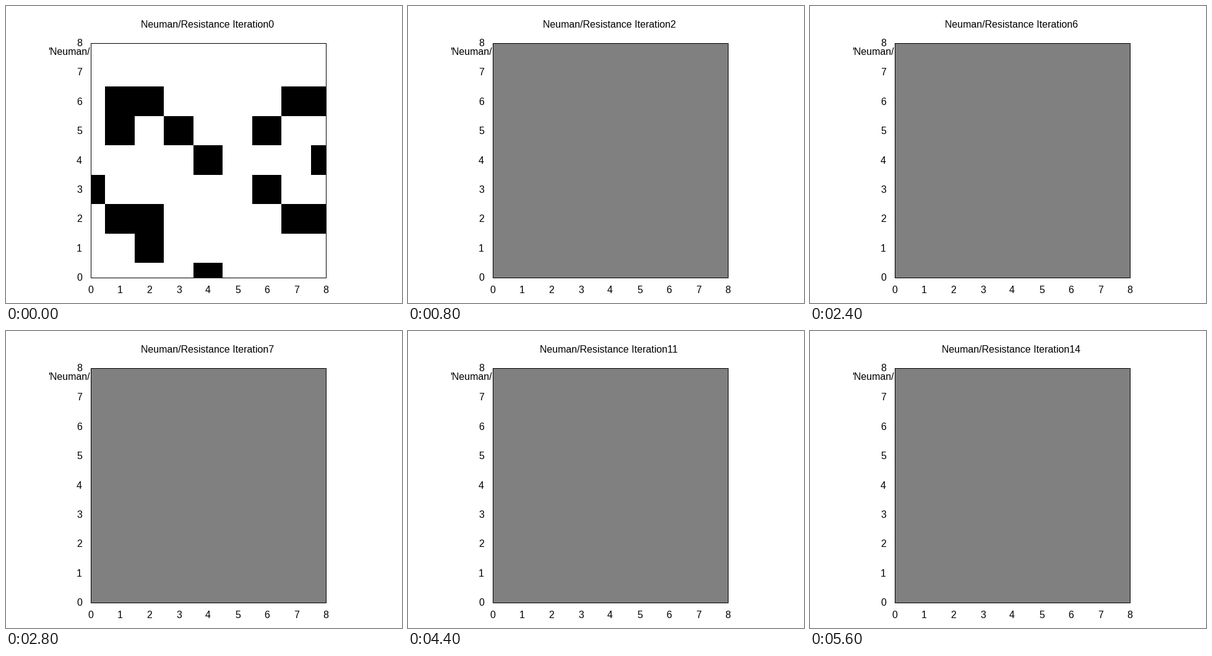
A matplotlib script that plays this animation: 640x480 px, repeating every 6000 ms.

```python
import math

import matplotlib.pyplot as plt
from matplotlib.animation import FuncAnimation
from matplotlib.patches import Rectangle

WIDTH, HEIGHT, DPI = 640, 480, 72
FRAMES, INTERVAL = 15, 400
LEFT, RIGHT, TOP, BOTTOM = 137, 517, 60, 439
STEP = 47.5

# Black cells of each generation: row -> columns
GENERATIONS = [
    {6: (1, 2, 7, 8), 5: (1, 3, 6), 4: (4, 8), 3: (0, 6),
     2: (1, 2, 7, 8), 1: (2,), 0: (4,)},
    {6: (1, 8), 5: (2,), 3: (8,), 2: (0, 2)},
]

plt.rcParams["font.family"] = "Liberation Sans"
plt.rcParams["text.hinting"] = "force_autohint"

fig = plt.figure(figsize=(WIDTH / DPI, HEIGHT / DPI), dpi=DPI, facecolor="white")
ax = fig.add_axes([0, 0, 1, 1])
ax.set_xlim(0, WIDTH)
ax.set_ylim(HEIGHT, 0)
ax.axis("off")


def box(x0, y0, x1, y1, color="black", z=1):
    """Fill the pixels from (x0, y0) up to, not including, (x1, y1)."""
    return ax.add_patch(Rectangle((x0, y0), x1 - x0, y1 - y0, facecolor=color,
                                  linewidth=0, antialiased=False, zorder=z))


def label(x, baseline, text):
    return ax.text(x, baseline, text, fontsize=16, color="black",
                   ha="left", va="baseline", zorder=4)


def nearest(value):
    return math.floor(value + 0.5)


def cell(col, row):
    x0 = max(LEFT, math.floor(LEFT + STEP * (col - 0.5)))
    x1 = min(RIGHT, math.floor(LEFT + STEP * (col + 0.5)))
    y0 = max(TOP, nearest(BOTTOM - STEP * (row + 0.5)))
    y1 = min(BOTTOM, nearest(BOTTOM - STEP * (row - 0.5)))
    return box(x0, y0, x1, y1)


layers = [[cell(col, row) for row, cols in rows.items() for col in cols]
          for rows in GENERATIONS]
layers.append([box(LEFT, TOP, RIGHT, BOTTOM, "#808080")])

# One-pixel frame around the plot
box(LEFT, TOP, RIGHT + 1, TOP + 1, z=3)
box(LEFT, BOTTOM, RIGHT + 1, BOTTOM + 1, z=3)
box(LEFT, TOP, LEFT + 1, BOTTOM + 1, z=3)
box(RIGHT, TOP, RIGHT + 1, BOTTOM + 1, z=3)

for tick in range(9):
    label(nearest(LEFT + STEP * tick) - 5, 464, str(tick))
    label(114, nearest(BOTTOM - (BOTTOM - TOP) * tick / 8) + 5, str(tick))
label(68, 79, "'Neuman/")
title = label(218, 35, "")


def update(frame):
    current = min(frame, len(layers) - 1)
    for index, layer in enumerate(layers):
        for patch in layer:
            patch.set_visible(index == current)
    title.set_text(f"Neuman/Resistance Iteration{frame}")
    title.set_x(218 if frame < 10 else 213)
    return [title]


anim = FuncAnimation(fig, update, frames=FRAMES, interval=INTERVAL,
                     repeat=True, repeat_delay=0, blit=False)
plt.show()
```
